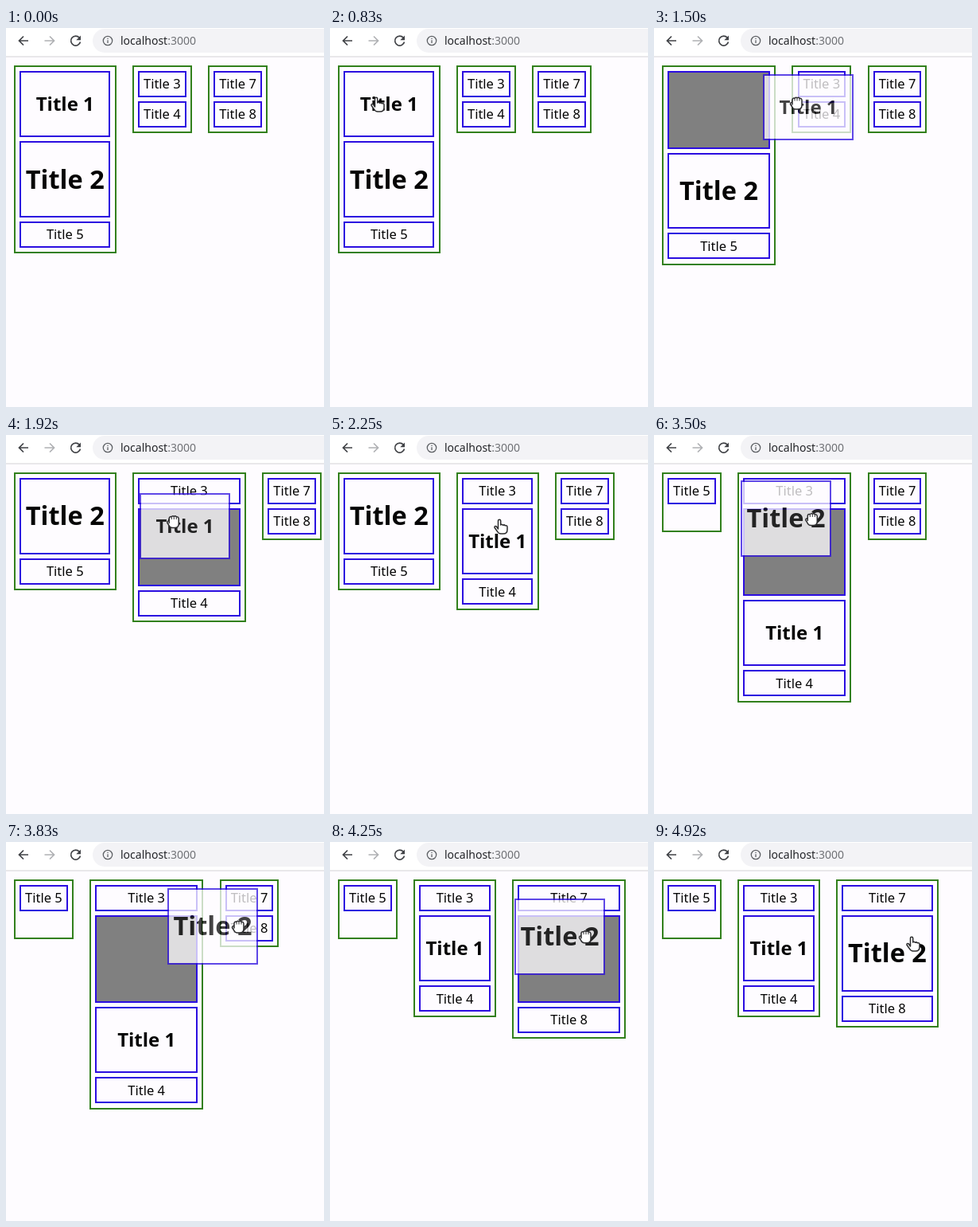
Recreate the animation shown at these times as an HTML page with a canvas. Size 400x476 px, loop 5010 ms.

```html
<!DOCTYPE html>
<html lang="en">
<head>
<meta charset="utf-8">
<title>Drag and drop board</title>
<style>
html, body { margin: 0; height: 100%; overflow: hidden; background: #fefcff; }
canvas { display: block; }
</style>
</head>
<body>
<canvas id="stage" width="400" height="476"></canvas>
<script>
const ctx = document.getElementById("stage").getContext("2d");
const LOOP = 5010, TICK = 83.5, LAST_TICK = 59;
const BLUE = "#2b0de0", GREEN = "#32801c", PAGE = "#fefcff";
const FONT = '"Noto Sans", "Open Sans", sans-serif';
const GAP = 20.4, PAD = 7.1, CARD_GAP = 5, HOLE_EXTRA = 14.4, HELD_WIDTH = 114.4;

const small = { w: 60.6, h: 33, font: 16.5, weight: 400 };
const sizes = {
  1: { w: 89.4, h: 83.2, font: 24, weight: 700 },
  2: { w: 114.3, h: 95.7, font: 32.5, weight: 700 }
};
const sizeOf = id => sizes[id] || small;

// Board states: start tick, cards per column, card being dragged
const states = [
  [0, "125 34 78", 0],
  [13, "125 34 78", 1],
  [19, "25 314 78", 1],
  [24, "25 314 78", 0],
  [40, "5 3214 78", 2],
  [48, "5 314 728", 2],
  [53, "5 314 728", 0]
];

// Pointer path: tick, x, y
const path = [
  [1, 324, 14], [7, 60, 96], [10, 60, 96], [12, 59, 91], [13, 63, 91],
  [18, 179, 94], [20, 205, 104], [24, 212, 110], [27, 215, 115],
  [30, 215, 115], [35, 110, 104], [38, 106, 102], [39, 128, 105],
  [46, 292, 106], [50, 320, 116], [53, 323, 124], [57, 326, 128]
];
const grabbedAt = { 1: [59, 90], 2: [106, 102] };

const cursors = {
  arrow: new Path2D("M0 0V15l3.6-3.4 2.4 5 2.3-1-2.4-5H11z"),
  hand: new Path2D("M-3.5 3V-7.2a1.6 1.6 0 0 1 3.2 0V-2q1.6-1.4 2.8.3 1.8-1.1 2.8.5 2.5-.6 2.7 1.7V4q0 5-5 5H0q-3 0-4.6-3L-8 1.2q-.2-2.4 2.2-1.4z"),
  grab: new Path2D("M-5 2V-4q.5-2.5 3-1.8 1.5-1.8 3-.4 2-1.2 3 .6 2.6-.4 3 2V3q0 5-5 5H-1q-3 0-4.3-3L-7.5 1.5q0-2.6 2.5-1.7z")
};
const fingers = new Path2D("M-2-5.5v3M1-6v3.5M4-5.2v2.7");

function text(str, x, y, size, weight, color, align = "center") {
  ctx.font = `${weight} ${size}px ${FONT}`;
  ctx.textAlign = align;
  ctx.fillStyle = color;
  ctx.fillText(str, x, y);
}

function box(x, y, w, h, line, fill) {
  const left = Math.round(x), top = Math.round(y);
  const width = Math.round(x + w) - left, height = Math.round(y + h) - top;
  ctx.fillStyle = fill;
  ctx.fillRect(left, top, width, height);
  ctx.strokeStyle = line;
  ctx.lineWidth = 2;
  ctx.strokeRect(left + 1, top + 1, width - 2, height - 2);
}

function card(id, x, y, w) {
  const { h, font, weight } = sizeOf(id);
  box(x, y, w, h, BLUE, PAGE);
  text("Title " + id, x + w / 2, y + h / 2 + font * 0.35, font, weight, "#050505");
}

function strokePath(d, color, width = 1.7) {
  ctx.strokeStyle = color;
  ctx.lineWidth = width;
  ctx.stroke(new Path2D(d));
}

function toolbar() {
  ctx.fillStyle = "#fff";
  ctx.fillRect(0, 0, 400, 36);
  ctx.fillStyle = "#f3f3f6";
  ctx.beginPath();
  ctx.roundRect(109, 1, 320, 30, 15);
  ctx.fill();
  ctx.fillStyle = "#d3d3d6";
  ctx.fillRect(0, 35.5, 400, 1);
  strokePath("M28 16H17M22 10.5L16.5 16l5.5 5.5", "#404246");
  strokePath("M48.500 16h11M55 10.500l5.500 5.500-5.500 5.500", "#b0b1b4");
  strokePath("M92.300 12.200A6 6 0 1 0 93.500 17.500", "#404246");
  ctx.fillStyle = "#404246";
  ctx.fill(new Path2D("M94 9.500v5.700h-5.700z"));
  strokePath("M122.300 16a5.700 5.700 0 1 0 11.400 0a5.700 5.700 0 1 0-11.400 0M128 15.300v3.700M128 12.700v1.400", "#5f6266", 1.3);
  text("localhost", 144, 21, 14, 400, "#232428", "left");
  text(":3000", 144 + ctx.measureText("localhost").width, 21, 14, 400, "#717377", "left");
}

function board(layout, held) {
  let x = 10;
  for (const column of layout.split(" ")) {
    const ids = [...column].map(Number);
    const widthOf = id => id === held ? HELD_WIDTH + HOLE_EXTRA : sizeOf(id).w;
    const heightOf = id => sizeOf(id).h + (id === held ? HOLE_EXTRA : 0);
    const inner = Math.max(...ids.map(widthOf));
    const content = ids.reduce((sum, id) => sum + heightOf(id) + CARD_GAP, -CARD_GAP);
    box(x, 47, inner + 2 * PAD, Math.max(75, content + 2 * PAD), GREEN, PAGE);
    let y = 47 + PAD;
    for (const id of ids) {
      if (id === held) box(x + PAD, y, inner, heightOf(id), BLUE, "#808080");
      else card(id, x + PAD, y, inner);
      y += heightOf(id) + CARD_GAP;
    }
    x += inner + 2 * PAD + GAP;
  }
}

function pointerAt(tick) {
  const next = path.findIndex(p => p[0] > tick);
  if (next < 0) return path[path.length - 1].slice(1);
  const [t0, x0, y0] = path[next - 1], [t1, x1, y1] = path[next];
  const k = (tick - t0) / (t1 - t0);
  return [x0 + (x1 - x0) * k, y0 + (y1 - y0) * k];
}

function cursor(kind, x, y) {
  ctx.save();
  ctx.translate(x, y);
  ctx.lineJoin = "round";
  ctx.lineWidth = 1.5;
  ctx.strokeStyle = "#2c2c2e";
  ctx.fillStyle = "#fff";
  ctx.fill(cursors[kind]);
  ctx.stroke(cursors[kind]);
  if (kind === "grab") {
    ctx.lineWidth = 1;
    ctx.stroke(fingers);
  }
  ctx.restore();
}

function draw(tick) {
  const [, layout, held] = states.findLast(s => s[0] <= tick);
  const lifting = tick === 39;
  ctx.fillStyle = PAGE;
  ctx.fillRect(0, 0, 400, 476);
  toolbar();
  board(layout, held);
  if (tick < 1) return;

  const [x, y] = pointerAt(tick);
  ctx.globalAlpha = 0.75;
  if (lifting) {
    ctx.fillStyle = PAGE;
    ctx.fillRect(25, 54, 114, 96);
  }
  ctx.globalAlpha = 1;
  if (held) ghost(held, x, y);
  cursor(held || lifting ? "grab" : tick < 6 ? "arrow" : "hand", x, y);
}

// Composited separately so the whole card fades as one layer
const layer = document.createElement("canvas");
layer.width = 130;
layer.height = 110;
const layerCtx = layer.getContext("2d");
function ghost(id, x, y) {
  const { h, font, weight } = sizeOf(id), w = 114, height = Math.round(h);
  layerCtx.clearRect(0, 0, 130, 110);
  layerCtx.fillStyle = PAGE;
  layerCtx.fillRect(0, 0, w, height);
  layerCtx.strokeStyle = BLUE;
  layerCtx.lineWidth = 2;
  layerCtx.strokeRect(1, 1, w - 2, height - 2);
  layerCtx.font = `${weight} ${font}px ${FONT}`;
  layerCtx.textAlign = "center";
  layerCtx.fillStyle = "#050505";
  layerCtx.fillText("Title " + id, w / 2, h / 2 + font * 0.35);
  const [gx, gy] = grabbedAt[id];
  ctx.globalAlpha = 0.75;
  ctx.drawImage(layer, Math.round(17 + x - gx), Math.round(54 + y - gy));
  ctx.globalAlpha = 1;
}

const start = performance.now();
function frame() {
  const time = (performance.now() - start) % LOOP;
  // Stepped like a 12 fps screen recording
  draw(Math.min(LAST_TICK, Math.floor((time + 12) / TICK)));
  requestAnimationFrame(frame);
}
frame();
</script>
</body>
</html>
```
